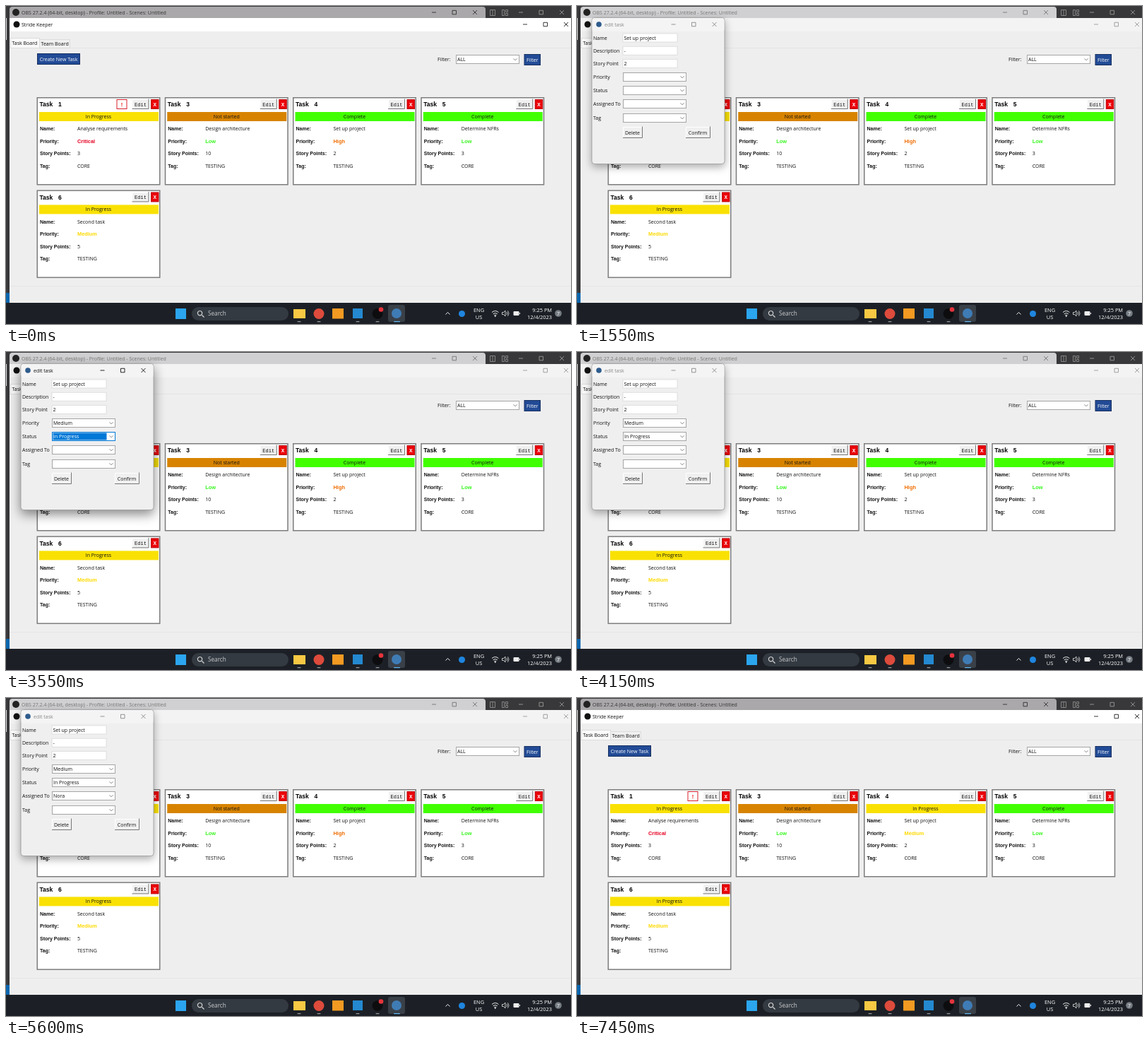
Animation, 800 px wide and 450 px high, one loop 7500 ms. Source, as an HTML page:

```html
<!DOCTYPE html>
<html lang="en">
<head>
<meta charset="utf-8">
<title>Task board</title>
<style>
html, body { margin: 0; width: 100%; height: 100%; overflow: hidden; background: #1c2026; }
svg { display: block; width: 800px; height: 450px; }
text { font: 7px "Open Sans", "Noto Sans", sans-serif; white-space: pre; }
.b { font: bold 7px "Liberation Sans", Arial, sans-serif; }
.p { font: bold 7.4px "Liberation Sans", Arial, sans-serif; }
.h { font: bold 8.5px "Liberation Sans", Arial, sans-serif; }
.m { font: 7px "Liberation Mono", monospace; }
.x { font: bold 7.5px "Liberation Mono", monospace; }
.s { font-size: 8.2px; }
.c { font-size: 7.4px; }
</style>
</head>
<body>
<svg id="stage" viewBox="0 0 800 450"></svg>
<script>
const LOOP = 7500, OPEN = 500, CLOSE = 7000;
// Each drop-down: label, chosen value, time its list opens, time of the choice
const PICKS = [
  ["Priority", "Medium", 1200, 2350],
  ["Status", "In Progress", 2900, 3450],
  ["Assigned To", "Nora", 3900, 4700],
  ["Tag", "CORE", 4800, 6450]
];
const STATUS = { "In Progress": "#f9e104", "Not started": "#d78300", Complete: "#41ff00" };
const PRIORITY = { Critical: "#e60022", High: "#ef6c00", Medium: "#ffd900", Low: "#35f51c" };
const TASKS = [
  [1, "In Progress", "Analyse requirements", "Critical", 3, "CORE"],
  [3, "Not started", "Design architecture", "Low", 10, "TESTING"],
  [4, "Complete", "Set up project", "High", 2, "TESTING"],
  [5, "Complete", "Determine NFRs", "Low", 3, "CORE"],
  [6, "In Progress", "Second task", "Medium", 5, "TESTING"]
];
const EDITED = [4, "In Progress", "Set up project", "Medium", 2, "CORE"];

const rect = (x, y, w, h, fill, more = "") =>
  `<rect x="${x}" y="${y}" width="${w}" height="${h}" fill="${fill}" ${more}/>`;
const box = (x, y, w, h, fill, line) =>
  rect(x + .5, y + .5, w - 1, h - 1, fill, `stroke="${line}"`);
const text = (x, y, s, fill = "#111", cls = "", anchor = "start") =>
  `<text x="${x}" y="${y}" fill="${fill}" class="${cls}" text-anchor="${anchor}">${s}</text>`;
const dot = (x, y, r, fill, more = "") => `<circle cx="${x}" cy="${y}" r="${r}" fill="${fill}" ${more}/>`;
const line = (d, color, w = .9) => `<path d="${d}" fill="none" stroke="${color}" stroke-width="${w}"/>`;
const chevron = (x, y) => line(`M${x - 2.5} ${y - 1.2}l2.5 2.5l2.5 -2.5`, "#666", .8);

const winButtons = (x, y, color) =>
  line(`M${x - 3} ${y}h6M${x + 26} ${y - 2.7}h5.5v5.5h-5.5z` +
    `M${x + 55} ${y - 3}l6 6m0 -6l-6 6`, color);

const raised = (x, y, w, h) => rect(x, y, w, h, "#f0f0f0") +
  line(`M${x + .5} ${y + h}v${.5 - h}h${w}`, "#fff", 1) +
  line(`M${x} ${y + h - .5}h${w - .5}v${-h}`, "#777", 1);

const blueButton = (x, y, w, s) => box(x, y, w, 16, "#224b96", "#17305f") +
  text(x + w / 2, y + 10.5, s, "#fff", "", "middle");

const combo = (x, y, value, focused) =>
  box(x, y, 90, 13, "#fff", focused ? "#0078d7" : "#a5a5a5") +
  (focused ? rect(x + 1.5, y + 1.5, 76, 10, "#0078d7") : "") +
  text(x + 2, y + 9, value, focused ? "#fff" : "#111") + chevron(x + 84, y + 6.5);

function card([id, status, name, priority, points, tag], i) {
  const rows = [["Name", name], ["Priority", priority], ["Story Points", points], ["Tag", tag]];
  return `<g transform="translate(${43.5 + i % 4 * 181.25} ${129 + (i >> 2) * 131.4})">` +
    rect(.75, .75, 173.5, 123, "#fff", 'stroke="#7d7d7d" stroke-width="1.5"') +
    text(4, 13.2, "Task", "#000", "h") + text(30.5, 13.2, id, "#000", "h") +
    (priority == "Critical" ? box(113, 3, 15, 14, "#fff", "#d8202c") + text(120.5, 12.8, "!", "#e00", "x", "middle") : "") +
    raised(135, 3, 24, 14) + text(147, 12.5, "Edit", "#111", "m", "middle") +
    box(161.5, 3, 11.5, 14, "#ec0008", "#b90008") + text(167.2, 12.7, "X", "#fff", "x", "middle") +
    rect(3.5, 21, 169, 13, STATUS[status]) + text(87.5, 30, status, "#111", "", "middle") +
    rows.map(([label, value], k) => {
      const y = 47.4 + k * 17.5, color = PRIORITY[value];
      return text(4.5, y, label + ":", "#111", "b") + text(57.5, y, value, color, color ? "p" : "");
    }).join("") + "</g>";
}

function desktop(front) {
  const ink = front ? "#333" : "#777";
  return rect(0, 0, 800, 450, "#38383a") + rect(0, 17, 1, 31, "#ddd") + rect(0, 406, 5, 14, "#0a66ad") +
    `<path d="M5 17V5q0-4 4-4h666q4 0 4 4v12z" fill="${front ? "#aaa8aa" : "#d0cfd1"}"/>` +
    dot(14, 9, 5, "#222") +
    text(22, 11.7, "OBS 27.2.4 (64-bit, desktop) - Profile: Untitled - Scenes: Untitled", ink) +
    winButtons(606, 9, ink) +
    line("M685.5 5.5h7v8h-7zM689 5.5v8M702.5 5.5h3v8h-3zM707.5 5.5h3v3h-3zM707.5 10.5h3v3h-3z", "#999", .8) +
    winButtons(729, 9, "#999");
}

function board(front, tasks) {
  return rect(5, 17, 795, 403, "#efeeef") + rect(5, 17, 795, 19, front ? "#fff" : "#f4f3f4") +
    dot(15, 26, 4.5, "#111") + text(22, 29, "Stride Keeper", front ? "#111" : "#888") +
    winButtons(735, 26, front ? "#222" : "#999") +
    rect(5, 59, 795, 1, "#e5e4e5") + rect(5, 396, 795, 1, "#e6e5e6") +
    box(47, 47, 44, 13, "#f0f0f0", "#dddcdd") + box(6, 45, 42, 15, "#f9f9f9", "#dddcdd") +
    text(8.5, 55, "Task Board") + text(49.5, 56, "Team Board") +
    blueButton(44, 67, 61, "Create New Task") + text(611, 78.2, "Filter:") +
    combo(637, 69, "ALL") + blueButton(733.5, 68, 23.5, "Filter") +
    tasks.map(card).join("");
}

function taskbar() {
  return rect(0, 420, 800, 30, "#1c2026") + rect(240, 428, 15, 15, "#2ba5ee") +
    rect(263, 426, 137, 19, "#343a41", 'rx="9.5"') +
    line("M277.5 437.5l3 3M274.5 431.5a3.2 3.2 0 1 0 .1 0z", "#ddd", 1.1) +
    text(286, 438, "Search", "#c9cdd1", "s") +
    rect(407, 429, 17, 13, "#f7c843") + dot(443, 435.5, 7.5, "#dd4b3c") +
    rect(462, 428, 16, 14.5, "#f29a22") + rect(491, 428, 14, 14, "#2489d0") +
    dot(526, 435.5, 7.5, "#0d0d0f") + dot(531, 429.5, 3.3, "#e5343d") +
    rect(541, 423, 24, 24, "#3a4048", 'rx="3"') + dot(553, 435, 7, "#3f7cb5") +
    [415, 443, 498, 526].map(x => rect(x - 2.5, 446, 5, 1.3, "#999", 'rx=".6"')).join("") +
    rect(549, 446, 9, 1.3, "#62b8f2", 'rx=".6"') +
    line("M622.5 436.5l3 -3l3 3", "#eee", 1) + dot(645.5, 435.5, 4.5, "#1f86e0") +
    text(669.5, 432.5, "ENG", "#fff", "c", "middle") + text(669.5, 442.7, "US", "#fff", "c", "middle") +
    line("M688 433.5q4.7-4 9.4 0M689.7 435.7q3-2.4 6 0M691.2 437.8q1.5-1.2 3 0", "#eee", 1) +
    dot(692.7, 439, .9, "#eee") +
    line("M702.5 433.5h2l2.5-2.5v8l-2.5-2.5h-2zM709 433q1.6 2 0 4M710.5 431.3q3 3.7 0 7.4", "#eee", .8) +
    rect(718.5, 432, 8, 6, "#eee", 'rx="1"') + rect(727, 434, 1, 2, "#eee") +
    text(773, 432.5, "9:25 PM", "#fff", "c", "end") + text(773, 442.7, "12/4/2023", "#fff", "c", "end") +
    dot(782, 435, 4.8, "#777d84") + text(782, 437.6, "7", "#fff", "", "middle");
}

function dialog(t) {
  const active = !PICKS.some(([, , from, to]) => t >= from && t < to);
  const last = PICKS.filter(p => t >= p[3]).length - 1;
  const ink = active ? "#111" : "#888";
  const shadow = active ? "0 6px 8px #0007" : "0 4px 6px #0005";
  const entries = [["Name", "Set up project"], ["Description", "-"], ["Story Point", "2"]];
  return `<g style="filter:drop-shadow(${shadow})">` +
    rect(21, 16.5, 188, 207, "#f0eff0", 'rx="4" stroke="#999" stroke-width=".8"') + "</g>" +
    rect(21.5, 17, 187, 19, "#f5f4f5", 'rx="3.5"') +
    dot(31, 26, 3.8, "#2d5b8c") + text(39, 29, "edit task", ink) + winButtons(136.5, 26, ink) +
    entries.map(([label, value], i) => {
      const y = 39 + i * 18.2;
      return text(23, y + 8.7, label) + rect(65, y, 77, 12, "#fff", 'stroke="#d5d5d5" stroke-width=".7"') +
        text(66.5, y + 8.6, value);
    }).join("") +
    PICKS.map(([label, value, , at], i) => {
      const y = Math.round(93.5 + i * 19.4);
      return text(23, y + 8.8, label) + combo(65, y, t >= at ? value : "", active && i == last);
    }).join("") +
    raised(65, 171, 28, 16) + text(78.5, 181.5, "Delete", "#111", "", "middle") +
    raised(154, 171, 35, 16) + text(171, 181.5, "Confirm", "#111", "", "middle");
}

const stage = document.getElementById("stage");
const start = performance.now();
let shown = "";

function frame() {
  const t = Math.max(0, performance.now() - start) % LOOP;
  const open = t >= OPEN && t < CLOSE;
  const tasks = TASKS.map(task => t >= CLOSE && task[0] == EDITED[0] ? EDITED : task);
  const picture = desktop(!open) + board(!open, tasks) + taskbar() + (open ? dialog(t) : "");
  if (picture != shown) stage.innerHTML = shown = picture;
  requestAnimationFrame(frame);
}
frame();
</script>
</body>
</html>
```
